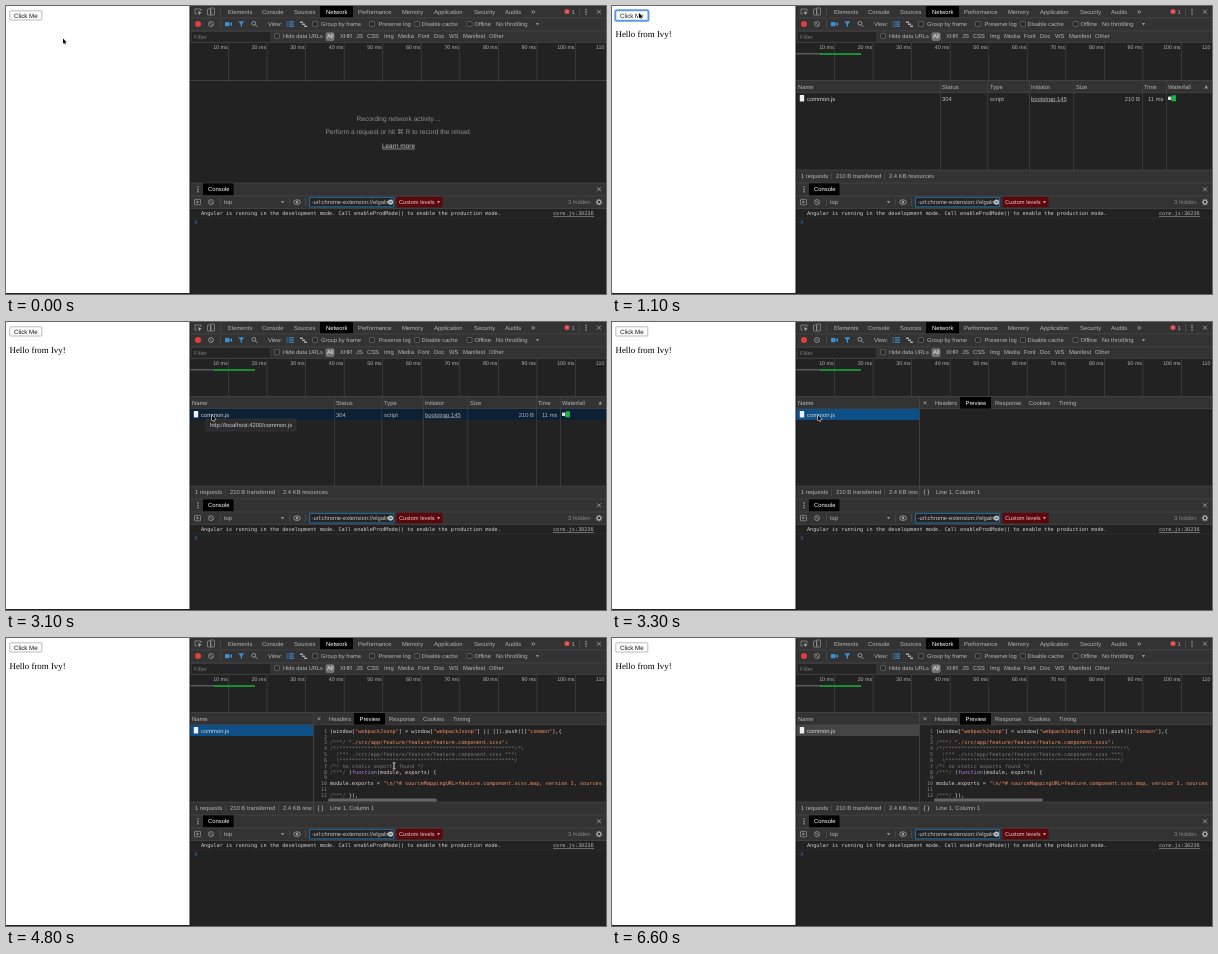
Animation of 600 by 288 pixels, one loop 7 s. Source, as an HTML page with a canvas:

```html
<!DOCTYPE html>
<html lang="en">
<head>
<meta charset="utf-8">
<title>Lazy loading in the network panel</title>
<style>
html, body { margin: 0; width: 100%; height: 100%; overflow: hidden; background: #fff; }
canvas { display: block; width: 600px; height: 288px; }
</style>
</head>
<body>
<canvas id="stage" width="600" height="288"></canvas>
<script>
const c = document.getElementById('stage').getContext('2d');
const LOOP = 7000, STEP = 100;
const SANS = '"Liberation Sans", Arial, sans-serif';
const SERIF = '"Liberation Serif", serif';
const MONO = '"DejaVu Sans Mono", monospace';
const BAR = '#333', BODY = '#222', EDGE = '#484848', TEXT = '#b4b4b4', DIM = '#858585', BLUE = '#3b8fd0';

function rect(x, y, w, h, color) {
  c.fillStyle = color;
  c.fillRect(x, y, w, h);
}

function box(x, y, w, h, r, fill, stroke, width = 0.7) {
  c.beginPath();
  c.roundRect(x, y, w, h, r);
  if (fill) { c.fillStyle = fill; c.fill(); }
  if (stroke) { c.strokeStyle = stroke; c.lineWidth = width; c.stroke(); }
}

function line(color, width, ...p) {
  c.beginPath();
  for (let i = 0; i < p.length; i += 2) c.lineTo(p[i], p[i + 1]);
  c.strokeStyle = color;
  c.lineWidth = width;
  c.stroke();
}

function poly(color, ...p) {
  c.beginPath();
  for (let i = 0; i < p.length; i += 2) c.lineTo(p[i], p[i + 1]);
  c.closePath();
  c.fillStyle = color;
  c.fill();
}

function ring(x, y, r, color, width = 0.8) {
  c.beginPath();
  c.arc(x, y, r, 0, 7);
  c.strokeStyle = color;
  c.lineWidth = width;
  c.stroke();
}

function dot(x, y, r, color) {
  c.beginPath();
  c.arc(x, y, r, 0, 7);
  c.fillStyle = color;
  c.fill();
}

// y is the baseline
function text(s, x, y, color = TEXT, size = 5.85, font = SANS, align = 'left') {
  c.font = `${size}px ${font}`;
  c.textAlign = align;
  c.fillStyle = color;
  c.fillText(s, x, y);
}

const right = (s, x, y, color) => text(s, x, y, color, 5.85, SANS, 'right');
const mono = (s, x, y, color) => text(s, x, y, color, 5.2, MONO);

function link(s, x, y, w, draw = text) {
  draw(s, x, y, TEXT);
  line(TEXT, 0.5, x, y + 1.1, x + w, y + 1.1);
}

function clip(x, y, w, h, draw) {
  c.save();
  c.beginPath();
  c.rect(x, y, w, h);
  c.clip();
  draw();
  c.restore();
}

function cross(x, y, r = 2) {
  line('#aaa', 0.8, x - r, y - r, x + r, y + r);
  line('#aaa', 0.8, x - r, y + r, x + r, y - r);
}

function dots(x, y) {
  for (const d of [-2.3, 0, 2.3]) dot(x, y + d, 0.75, '#aaa');
}

function noEntry(x, y) {
  ring(x, y, 2.5, '#999');
  line('#999', 0.8, x - 1.8, y - 1.8, x + 1.8, y + 1.8);
}

const check = (x, y) => box(x, y, 5, 5, 0.8, '#2a2a2a', '#777', 0.6);
const arrowDown = (x, y) => poly('#999', x - 1.6, y - 1.2, x + 1.6, y - 1.2, x, y + 1.4);

function page(loaded, focused) {
  rect(0, 0, 184, 288, '#fff');
  if (focused) box(3.3, 4.2, 33.2, 10.6, 1.5, '#fff', '#5b98e6', 2);
  else box(3.8, 4.8, 32, 9.2, 0.6, '#fdfdfd', '#a0a0a0');
  text('Click Me', 8, 11.7, '#111', 6.2);
  if (loaded) text('Hello from Ivy!', 3.5, 31, '#000', 8.9, SERIF);
  rect(0, 287, 184, 1, '#222');
}

function tabs() {
  rect(184, 0, 416, 37, BAR);
  rect(314, 0, 33, 11.5, '#000');
  const names = [['Elements', 222], ['Console', 256], ['Sources', 288], ['Network', 320], ['Performance', 352],
    ['Memory', 396], ['Application', 428], ['Security', 468], ['Audits', 499]];
  for (const [s, x] of names) text(s, x, 7.8, s === 'Network' ? '#fff' : TEXT);
  line('#999', 0.7, 191, 8, 189, 8, 189, 3, 195, 3, 195, 5);
  poly('#aaa', 192, 5, 196, 7, 194, 7.5, 193, 9.5);
  box(201.5, 3, 3.5, 6, 0.5, null, '#999');
  box(204.5, 2, 4, 7, 0.5, null, '#999');
  rect(214, 2, 0.6, 8, '#555');
  text('»', 525, 8, TEXT, 8);
  dot(561, 5.5, 2.6, '#e04343');
  cross(561, 5.5, 0.9);
  text('1', 565.5, 7.8);
  rect(573, 2, 0.6, 8, '#555');
  dots(580, 5.7);
  cross(593, 5.7);
  for (const y of [11.6, 24.6, 36.6]) rect(184, y, 416, 0.7, EDGE);
}

function tools() {
  dot(192, 18, 3, '#e33e3e');
  noEntry(205, 18);
  rect(214, 14, 0.6, 8, '#555');
  box(219, 16, 4.5, 4.2, 0.6, BLUE);
  poly(BLUE, 223.5, 18, 226, 16, 226, 20.2);
  poly(BLUE, 232.3, 15.3, 238.3, 15.3, 236, 18.2, 236, 21, 234.6, 20.2, 234.6, 18.2);
  ring(247.8, 17.3, 1.9, '#aaa');
  line('#aaa', 0.9, 249.2, 18.7, 251.3, 20.8);
  text('View:', 262, 20.1);
  for (const y of [15.8, 18, 20.2]) {
    rect(280.5, y - 0.5, 1.2, 1.1, BLUE);
    rect(282.7, y - 0.5, 5.3, 1.1, BLUE);
  }
  for (const i of [0, 1, 2]) rect(294 + i * 2, 15.5 + i * 2, 3, 1.5, '#aaa');
  const checks = [['Group by frame', 306.5, 315], ['Preserve log', 363.5, 372.5], ['Disable cache', 408.5, 415.5], ['Offline', 461, 468.5]];
  for (const [s, x, tx] of checks) {
    check(x, 15.5);
    text(s, tx, 20.1, TEXT, 5.75);
  }
  text('No throttling', 490, 20.1);
  arrowDown(531.5, 18.2);

  rect(186, 26, 78, 9.6, '#242424');
  text('Filter', 188, 32.8, '#777');
  check(268.5, 27.6);
  text('Hide data URLs', 277, 32.4, TEXT, 5.65);
  box(319.5, 26.3, 9, 8.6, 2, '#737373');
  text('All', 321, 32.4, '#eee');
  const kinds = [['XHR', 334], ['JS', 350], ['CSS', 361], ['Img', 378], ['Media', 392], ['Font', 412],
    ['Doc', 428], ['WS', 443], ['Manifest', 457], ['Other', 483]];
  for (const [s, x] of kinds) text(s, x, 32.4);
}

function overview(loaded) {
  rect(184, 37, 416, 38, BODY);
  for (let i = 1; i <= 10; i++) {
    const x = 184 + i * 38.55;
    rect(x - 0.4, 37, 0.7, 37.5, '#444');
    text(i * 10 + ' ms', x - 1, 43.4, TEXT, 5.3, SANS, 'right');
  }
  text('110', 598.5, 43.4, TEXT, 5.3, SANS, 'right');
  rect(184, 74, 416, 0.8, EDGE);
  if (loaded) {
    rect(184, 47.3, 25, 1, '#777');
    rect(208, 47.2, 41, 1.6, '#18a93c');
  }
}

function emptyList() {
  const mid = (s, y) => text(s, 392.5, y, '#8f8f8f', 6.65, SANS, 'center');
  mid('Recording network activity…', 115.2);
  mid('Perform a request or hit ⌘ R to record the reload.', 128.2);
  text('Learn more', 392.5, 141.6, '#c8c8c8', 6.5, SANS, 'center');
  line('#c8c8c8', 0.6, 376, 143, 409, 143);
}

function fileName() {
  box(187.8, 89, 4.4, 6.6, 0.3, '#eee');
  text('common.js', 195, 94.5, '#d0d0d0');
}

function table(hover, tip) {
  rect(184, 75, 416, 11.6, BAR);
  rect(184, 86.4, 416, 0.7, EDGE);
  if (hover) rect(184, 87, 416, 11, '#0c2036');
  for (const x of [328, 375.5, 417, 461.5, 530, 554]) rect(x, 75, 0.7, 89, '#444');
  const heads = [['Name', 186], ['Status', 330], ['Type', 378], ['Initiator', 419], ['Size', 464], ['Time', 532], ['Waterfall', 556]];
  for (const [s, x] of heads) text(s, x, 82.8);
  poly('#999', 592.5, 82.5, 596, 82.5, 594.2, 79);
  fileName();
  text('304', 330, 94.5);
  text('script', 378, 94.5);
  link('bootstrap:145', 419, 94.5, 35.5);
  right('210 B', 528, 94.5);
  right('11 ms', 551.5, 94.5);
  rect(556, 90.6, 3.4, 3.4, '#ddd');
  rect(559.4, 89.3, 4.6, 6, '#19b34a');
  if (tip) {
    box(200, 97, 90, 12, 0.5, '#2b2b2b', '#3c3c3c', 0.5);
    text('http://localhost:4200/common.js', 204, 105.1, '#ccc');
  }
}

function status(split) {
  rect(184, 164, 416, 13, BAR);
  rect(184, 163.7, 416, 0.7, EDGE);
  clip(184, 164, split ? 122 : 416, 13, () => {
    text('1 requests', 189, 172.4);
    rect(219.5, 167, 0.5, 7, '#555');
    text('210 B transferred', 224, 172.4);
    rect(272.5, 167, 0.5, 7, '#555');
    text('2.4 KB resources', 277, 172.4);
  });
}

const STR = '#ec9063', NOTE = '#787878', CODE = '#d4d4d4', stars = '*'.repeat(56);
const path = './src/app/feature/feature/feature.component.scss';
const source = [
  [['(window[', CODE], ['"webpackJsonp"', STR], ['] = window[', CODE], ['"webpackJsonp"', STR], ['] || []).push([[', CODE], ['"common"', STR], ['],{', CODE]],
  [],
  [['/***/ ', NOTE], [`"${path}"`, STR], [':', CODE]],
  [[`/*!${stars}!*\\`, NOTE]],
  [[`  !*** ${path} ***!`, NOTE]],
  [[`  \\${stars}/`, NOTE]],
  [['/*! no static exports found */', NOTE]],
  [['/***/ ', NOTE], ['(', CODE], ['function', '#a58be0'], ['(module, exports) {', CODE]],
  [],
  [['module.exports = ', CODE], ['"\\n/*# sourceMappingURL=feature.component.scss.map, version 3, sources and mappings */"', STR]],
  [],
  [['/***/ ', NOTE], ['}),', CODE]]
];

function code() {
  clip(308, 87, 290.5, 76.5, () => source.forEach((parts, i) => {
    const y = 94.7 + i * 5.83;
    text(i + 1, 321, y, DIM, 5, MONO, 'right');
    let col = 0;
    for (const [s, color] of parts) {
      mono(s, 324 + col * 3.13, y, color);
      col += s.length;
    }
  }));
  box(322, 160.4, 109, 3, 1.5, '#666');
}

function preview(showCode, active) {
  rect(184, 75, 416, 11.6, BAR);
  rect(184, 86.4, 416, 0.7, EDGE);
  text('Name', 186, 82.8);
  rect(184, 87, 123, 11, active ? '#0d4f87' : '#454545');
  fileName();
  cross(313, 80.7, 1.4);
  rect(348, 75, 31, 11.6, '#000');
  const names = [['Headers', 323], ['Preview', 353.5], ['Response', 383], ['Cookies', 417], ['Timing', 447]];
  for (const [s, x] of names) text(s, x, 82.8, s === 'Preview' ? '#fff' : TEXT);
  if (showCode) code();
  text('{ }', 311.5, 172.4, '#ccc', 6.2);
  text('Line 1, Column 1', 324, 172.4);
  rect(307, 75, 0.8, 102, EDGE);
}

function consolePane() {
  rect(184, 177, 416, 25.5, BAR);
  rect(184, 176.7, 416, 0.7, EDGE);
  rect(197, 177.4, 30.5, 12, '#000');
  dots(192, 183.4);
  text('Console', 202, 185.4, '#fff');
  cross(593, 183.3);
  rect(184, 189.6, 416, 0.7, EDGE);

  box(188.5, 193.4, 6, 5.4, 0.4, null, '#999');
  poly('#999', 190.5, 194.6, 193, 196.1, 190.5, 197.6);
  noEntry(205, 196.1);
  for (const x of [214, 283.5, 299]) rect(x, 192, 0.6, 8, '#555');
  text('top', 218, 198.1);
  arrowDown(276.5, 196.1);
  c.beginPath();
  c.ellipse(291, 196.1, 3.4, 2.3, 0, 0, 7);
  c.strokeStyle = '#aaa';
  c.lineWidth = 0.8;
  c.stroke();
  dot(291, 196.1, 1.2, '#aaa');
  box(303.5, 191.4, 84, 9.5, 0.5, '#232323', '#2474b5', 0.9);
  clip(304, 191, 78, 11, () => text('-url:chrome-extension://elgaln', 305.5, 198.1, '#c4c4c4'));
  dot(384.5, 196.1, 2.6, '#c8c8c8');
  line('#333', 0.7, 383.5, 195.1, 385.5, 197.1);
  line('#333', 0.7, 383.5, 197.1, 385.5, 195.1);
  box(390.5, 190.8, 46, 10.5, 1, '#5b070b');
  text('Custom levels', 393, 198.1, '#e2caca', 5.7);
  poly('#c9a6a6', 431, 195, 434, 195, 432.5, 197.5);
  right('3 hidden', 584.5, 198.1, DIM);
  ring(593, 196.1, 1.9, '#aaa', 1.3);
  for (let a = 0; a < 8; a++) {
    const u = Math.cos(a * Math.PI / 4), v = Math.sin(a * Math.PI / 4);
    line('#aaa', 0.9, 593 + u * 2.2, 196.1 + v * 2.2, 593 + u * 3.3, 196.1 + v * 3.3);
  }
  rect(184, 202, 416, 0.7, EDGE);

  mono('Angular is running in the development mode. Call enableProdMode() to enable the production mode.', 195, 209.4, '#cfcfcf');
  link('core.js:30236', 547, 209.4, 41, mono);
  rect(184, 211.7, 416, 0.5, '#353535');
  line('#3578d8', 0.9, 188.8, 214.2, 190.8, 216, 188.8, 217.8);
}

// time, x, y
const track = [[0, 57, 32.5], [200, 40, 18], [500, 40, 18], [600, 27, 7], [1700, 27, 7], [2100, 87.5, 36],
  [2500, 186, 82], [2800, 206, 93.5], [3300, 206, 93.5], [4200, 377, 106], [4900, 390, 128], [5400, 424, 281]];

function pointer(t) {
  if (t >= 5500) return;
  let i = 0;
  while (i < track.length - 2 && t >= track[i + 1][0]) i++;
  const [t0, x0, y0] = track[i], [t1, x1, y1] = track[i + 1];
  const k = Math.min(1, (t - t0) / (t1 - t0));
  c.save();
  c.translate(x0 + (x1 - x0) * k, y0 + (y1 - y0) * k);
  if (t >= 4000 && t <= 5000) {
    line('#ddd', 1.6, 0, 0, 0, 6);
    line('#111', 0.7, 0, 0, 0, 6);
    line('#ddd', 0.7, -1.5, 0, 1.5, 0);
    line('#ddd', 0.7, -1.5, 6, 1.5, 6);
  } else {
    const shape = [0, 0, 0, 5.2, 1.2, 4.2, 2, 6, 2.9, 5.6, 2.1, 3.9, 3.7, 3.8];
    line('#fff', 1, ...shape, 0, 0);
    poly('#000', ...shape);
  }
  c.restore();
}

function draw(t) {
  const loaded = t >= 1000, split = t >= 3300;
  rect(0, 0, 600, 288, BODY);
  page(loaded, t >= 800 && t < 2900);
  tabs();
  tools();
  overview(loaded);
  if (loaded) status(split);
  if (!loaded) emptyList();
  else if (split) preview(t >= 3400, t < 6300);
  else table(t >= 2600, t >= 3100);
  consolePane();
  rect(183.5, 0, 0.8, 288, '#111');
  pointer(t);
}

c.textRendering = 'geometricPrecision';
function tick() {
  draw(Math.floor(performance.now() % LOOP / STEP) * STEP);
  requestAnimationFrame(tick);
}
tick();
</script>
</body>
</html>
```
